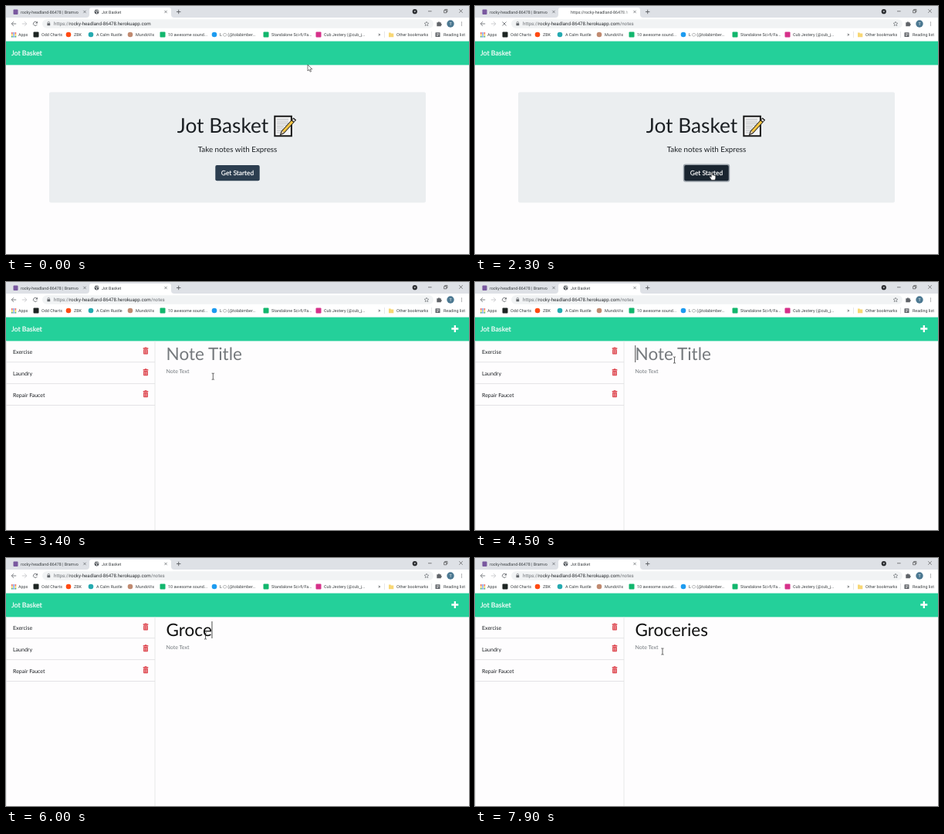
Animation of 600x321 px, one loop 8 s. Source, as an HTML page:

```html
<!DOCTYPE html>
<html lang="en">
<head>
<meta charset="utf-8">
<title>Jot Basket</title>
<style>
html, body { margin: 0; width: 100%; height: 100%; overflow: hidden; background: #fefdfe; }
svg { display: block; }
text { white-space: pre; text-rendering: geometricPrecision; }
.ui { font-family: Roboto, "Open Sans", sans-serif; font-size: 5.35px; fill: #3c4043; }
.app { font-family: Lato, "Open Sans", sans-serif; fill: #1b1f23; }
.light { fill: #fff; stroke: #fff; stroke-width: 0.2px; }
</style>
</head>
<body>
<svg id="stage" width="600" height="321" viewBox="0 0 600 321"></svg>
<script>
const LOOP = 8000, STEP = 100;
const PRESS = 2200, LEAVE = 2300, ARRIVE = 2400, LISTED = 2600, LOADED = 2700;
const FOCUS = 4400, TYPE = 5400, KEY = 125, WORD = 'Groceries';
const APP = 'Jot Basket', HOST = 'rocky-headland-86478.herokuapp.com';
const stage = document.getElementById('stage');

function el(name, attrs, parent = stage) {
  const node = document.createElementNS('http://www.w3.org/2000/svg', name);
  for (const key in attrs) node.setAttribute(key, attrs[key]);
  return parent.appendChild(node);
}
const group = parent => el('g', {}, parent);
const rect = (x, y, width, height, fill, parent, rx = 0) =>
  el('rect', { x, y, width, height, fill, rx }, parent);
const dot = (cx, cy, r, fill, parent) => el('circle', { cx, cy, r, fill }, parent);
const line = (d, stroke, width, parent) =>
  el('path', { d, stroke, 'stroke-width': width, fill: 'none' }, parent);
const shape = (d, fill, parent) => el('path', { d, fill }, parent);
function text(x, y, str, cls, style, parent) {
  const node = el('text', { x, y, class: cls, style: style || '' }, parent);
  node.textContent = str;
  return node;
}
const cross = (x, y, r, color, width, parent) =>
  line(`M${x - r} ${y - r}l${2 * r} ${2 * r}m0 ${-2 * r}l${-2 * r} ${2 * r}`, color, width, parent);
const show = (node, on) => node.setAttribute('visibility', on ? 'inherit' : 'hidden');

// Tab strip
rect(0, 0, 600, 321, '#fefdfe');
rect(0, 0, 600, 15, '#dee1e6');
shape('M104 15q4 0 4-4V5q0-3 3-3H211q3 0 3 3V11q0 4 4 4z', '#fff');
rect(9.5, 4.5, 6, 6.5, '#79589f', stage, 1);
text(19, 9.6, 'rocky-headland-86478 | Bramvo', 'ui');
cross(102, 7.5, 1.7, '#5f6368', 0.7);
cross(207, 7.5, 1.7, '#5f6368', 0.7);
line('M221 7.5h5.4M223.7 4.8v5.4', '#4a4d51', 0.8);
dot(529.8, 7.2, 3.1, '#2b2d30');
shape('M528.4 6.4h2.8l-1.4 1.8z', '#dee1e6');
line('M547 6.8h4.6M567.6 5.6h3.2v3.2h-3.2zM568.7 5.5v-1.1h3.2v3.2h-1.1', '#333', 0.6);
cross(589.5, 6.5, 2.2, '#333', 0.6);

const globe = group();
dot(117.5, 7.5, 2.9, '#55595e', globe);
line('M115.4 6.4l2 1 .4 2.4M117.6 5l.6 1.4 1.9.3', '#fff', 0.8, globe);
const spinner = line('M0 -2.8A2.8 2.8 0 0 1 2.8 0', '#8e7ba6', 0.8);
const tabTitle = text(124, 9.6, APP, 'ui');
const tabFade = el('linearGradient', { id: 'fade' });
el('stop', { offset: 0, 'stop-color': '#fff', 'stop-opacity': 0 }, tabFade);
el('stop', { offset: 1, 'stop-color': '#fff' }, tabFade);
rect(190, 3, 12, 10, 'url(#fade)');
rect(202, 3, 2.5, 10, '#fff');

// Toolbar
rect(0, 15, 600, 31, '#fff');
rect(47, 17.2, 507, 11.6, '#f1f3f4', stage, 5.8);
line('M13.2 23H7.4M10 20.2L7.2 23l2.8 2.8', '#5f6368', 0.8);
line('M20.8 23h5.8M24 20.2l2.8 2.8-2.8 2.8', '#bfc1c4', 0.8);
const reload = group();
line('M40 21.2A2.6 2.6 0 1 0 40.4 23.9', '#5f6368', 0.8, reload);
shape('M40.9 19.8v2.7h-2.7z', '#5f6368', reload);
const stop = cross(38, 23, 2.5, '#5f6368', 0.8);
rect(53.4, 22.3, 3.8, 3, '#5f6368', stage, 0.4);
line('M54.1 22.5v-1a1.2 1.2 0 0 1 2.4 0v1', '#5f6368', 0.6);
const url = text(62, 25.3, '', 'ui', 'font-size:6.2px');
const span = (str, fill) => {
  const node = el('tspan', { fill }, url);
  node.textContent = str;
  return node;
};
span('https://', '#6b6f74');
span(HOST, '#2b2e32');
const urlPath = span('', '#6b6f74');
line('M545 20.2l.85 1.8 2 .25-1.5 1.35.4 2-1.75-1-1.75 1 .4-2-1.5-1.35 2-.25z', '#5f6368', 0.6);
shape('M558.3 21.2h1.7a1 1 0 0 1 2 0h1.8v1.8a1 1 0 0 1 0 2v1.3h-5.5z', '#5f6368');
dot(576, 23, 4.7, '#4b7891');
text(576, 24.8, 'T', 'ui', 'fill:#fff;text-anchor:middle');
for (const dy of [-2, 0, 2]) dot(590.5, 23 + dy, 0.6, '#5f6368');

// Bookmarks
['#e34133', '#f2b90c', '#35a353'].forEach((c, i) => {
  for (let j = 0; j < 3; j++) rect(7 + j * 2.3, 34.3 + i * 2.3, 1.6, 1.6, j === 1 ? '#4d86e8' : c);
});
const marks = [
  [16, 'Apps'],
  [46, 'Odd Charts', '#1e2523'],
  [88, 'ZBK', '#ff4a12', 1],
  [117, 'A Calm Rustle', '#25aab0', 1],
  [168, 'MundoVix', '#c08a70', 1],
  [210, '10 awesome sound...', '#12b66d'],
  [277, 'L ⬡ (@tolabimber...', '#1d9bf0', 1],
  [344, 'Standalone Sci-fi/Fa...', '#12b66d'],
  [412, 'Cub Jestery (@cub_j...', '#d6318a'],
  [506, 'Other bookmarks'],
  [567, 'Reading list']
];
for (const [x, label, color, round] of marks) {
  text(x, 39, label, 'ui', 'font-size:5.4px');
  if (!color) continue;
  if (round) dot(x - 7, 37, 3.3, color);
  else rect(x - 10.5, 33.5, 7, 7, color, stage, 1);
}
text(482, 39, '»', 'ui', 'font-size:7px');
shape('M496 34.5h2.5l.8.9h3v4.9H496z', '#f8d775');
line('M490.5 33v8M551.5 33v8', '#d5d7da', 0.6);
rect(556.5, 34.2, 6, 5.8, '#5f6368', stage, 0.6);
line('M558 35.8h3.4M558 37.1h3.4M558 38.4h2', '#fff', 0.6);

// Page header
rect(0, 45.6, 600, 30.8, '#24d09a');
text(7, 63.8, APP, 'app light', 'font-size:8.8px');

// Welcome page
const home = group();
rect(56, 111.5, 488, 143, '#ebeef0', home, 2);
text(281, 164, APP, 'app', 'font-size:26.25px;text-anchor:middle', home);
text(300, 189.2, 'Take notes with Express', 'app', 'font-size:9.8px;text-anchor:middle', home);
const ring = rect(269.8, 204.5, 60.4, 23.2, '#9aa2aa', home, 3);
const button = rect(271.3, 206, 57.4, 20.2, '', home, 2);
text(300, 219.3, 'Get Started', 'app light', 'font-size:8.4px;text-anchor:middle', home);

const memo = group(home);
rect(348.3, 142.8, 21.6, 25.4, '#f4f4f4', memo, 0.5);
line('M348.3 142.8h21.6v25.4h-21.6z', '#191919', 2, memo);
for (let i = 0; i < 8; i++) line(`M351 ${146.5 + i * 2.5}h${i < 4 ? 15 : 13 - i}`, '#a9adb0', 0.8, memo);
line('M358.6 163.4L374.4 146', '#191919', 4.8, memo);
shape('M354.6 167.8l2.2-6 3.6 3.2z', '#191919', memo);
line('M359.4 162.5L371.2 149.5', '#f3c443', 3.2, memo);
line('M372 148.6L373.5 147', '#e9e5e0', 3, memo);
shape('M356.2 166l2-4.6 2.4 2.2z', '#f3d9ae', memo);

// Notes page
const notes = group();
line('M.5 76.4v245M193 76.4v245', '#e3e2e4', 0.8, notes);
line('M577.3 60.5h9M581.8 56v9', '#fff', 2.3, notes);
const list = group(notes);
['Exercise', 'Laundry', 'Repair Faucet'].forEach((label, i) => {
  const y = 76 + i * 27.9;
  text(9, y + 16.7, label, 'app', 'font-size:7.03px', list);
  line(`M0 ${y + 27.7}h193`, '#dddee0', 0.8, list);
  rect(177.6, y + 9.2, 6.8, 1.5, '#dc3d46', list, 0.4);
  rect(179.6, y + 8.4, 2.8, 1.2, '#dc3d46', list, 0.4);
  rect(178.1, y + 11.2, 5.8, 6.2, '#dc3d46', list, 0.7);
  line(`M179.6 ${y + 12}v4.5m1.4-4.5v4.5m1.4-4.5v4.5`, '#fff', 0.45, list);
});
const title = text(207.6, 101, '', 'app', 'font-size:22.5px', notes);
text(207.6, 118.2, 'Note Text', 'app', 'font-size:7.03px;fill:#6f757a', notes);
const caret = rect(0, 82, 0.8, 22, '#222', notes);

// Pointers, each with its hot spot at the origin
const arrow = el('path', {
  d: 'M0 0v8l1.9-1.7 1.3 2.9 1.3-.6-1.3-2.8h2.6z',
  fill: '#fff', stroke: '#222', 'stroke-width': 0.6
});
const hand = el('path', {
  d: 'M-.8 .3q.8-.8 1.6 0v3.2q.8-.6 1.4.2.8-.5 1.4.3 1-.3 1.2.6v2.6q-.2 1.5-1 2.6H-.6Q-1.8 7.5-3 6q0-1.2 1-.9l1.2 1z',
  fill: '#fff', stroke: '#222', 'stroke-width': 0.6
});
const beam = line('M-1.6 -4h1.3l.3.3.3-.3h1.3M0 -3.7v7.4M-1.6 4h1.3l.3-.3.3.3h1.3', '#222', 0.7);

// time, x, y
const path = [
  [0, 391, 76], [850, 327, 213], [1100, 319, 208.5], [1800, 307, 215.5], [2750, 307, 215.5],
  [3600, 262, 107], [4000, 258.5, 101], [7250, 258.5, 101], [7800, 243, 121], [8000, 243, 121]
];
function pointAt(t) {
  const i = path.findIndex(p => p[0] > t);
  const [t0, x0, y0] = path[i - 1], [t1, x1, y1] = path[i];
  const u = (t - t0) / (t1 - t0), k = u * u * (3 - 2 * u);
  return [x0 + (x1 - x0) * k, y0 + (y1 - y0) * k];
}

function draw(t) {
  const loading = t >= LEAVE && t < LOADED, pressed = t >= PRESS;
  show(home, t < ARRIVE);
  show(notes, t >= ARRIVE);
  show(list, t >= LISTED);
  show(globe, !loading);
  show(reload, !loading);
  show(stop, loading);
  show(spinner, t >= ARRIVE && loading);
  spinner.setAttribute('transform', `translate(117.5 7.5) rotate(${(t - ARRIVE) * 0.5 - 70})`);
  tabTitle.textContent = loading ? 'https://rocky-headland-86478.h' : APP;
  urlPath.textContent = t >= LEAVE ? '/notes' : '';
  show(ring, pressed);
  button.setAttribute('fill', pressed ? '#1a2530' : '#2c3e50');

  const typed = WORD.slice(0, Math.max(0, Math.floor((t - TYPE) / KEY) + 1));
  title.textContent = typed || 'Note Title';
  title.style.fill = typed ? '#111' : '#75797d';
  const lastKey = typed ? TYPE + (typed.length - 1) * KEY : FOCUS;
  show(caret, t >= FOCUS && (t - lastKey) % 1000 < 500);
  caret.setAttribute('x', 207.4 + (typed ? title.getComputedTextLength() : 0));

  const [x, y] = pointAt(t);
  const onButton = t < ARRIVE && x < 329 && y > 206;
  const kind = onButton || (t >= ARRIVE && t < 2800) ? hand : t < ARRIVE ? arrow : beam;
  for (const c of [arrow, hand, beam]) show(c, c === kind);
  kind.setAttribute('transform', `translate(${x} ${y})`);
}

function tick(now) {
  draw(Math.floor(now % LOOP / STEP) * STEP);
  requestAnimationFrame(tick);
}
draw(0);
requestAnimationFrame(tick);
</script>
</body>
</html>
```
